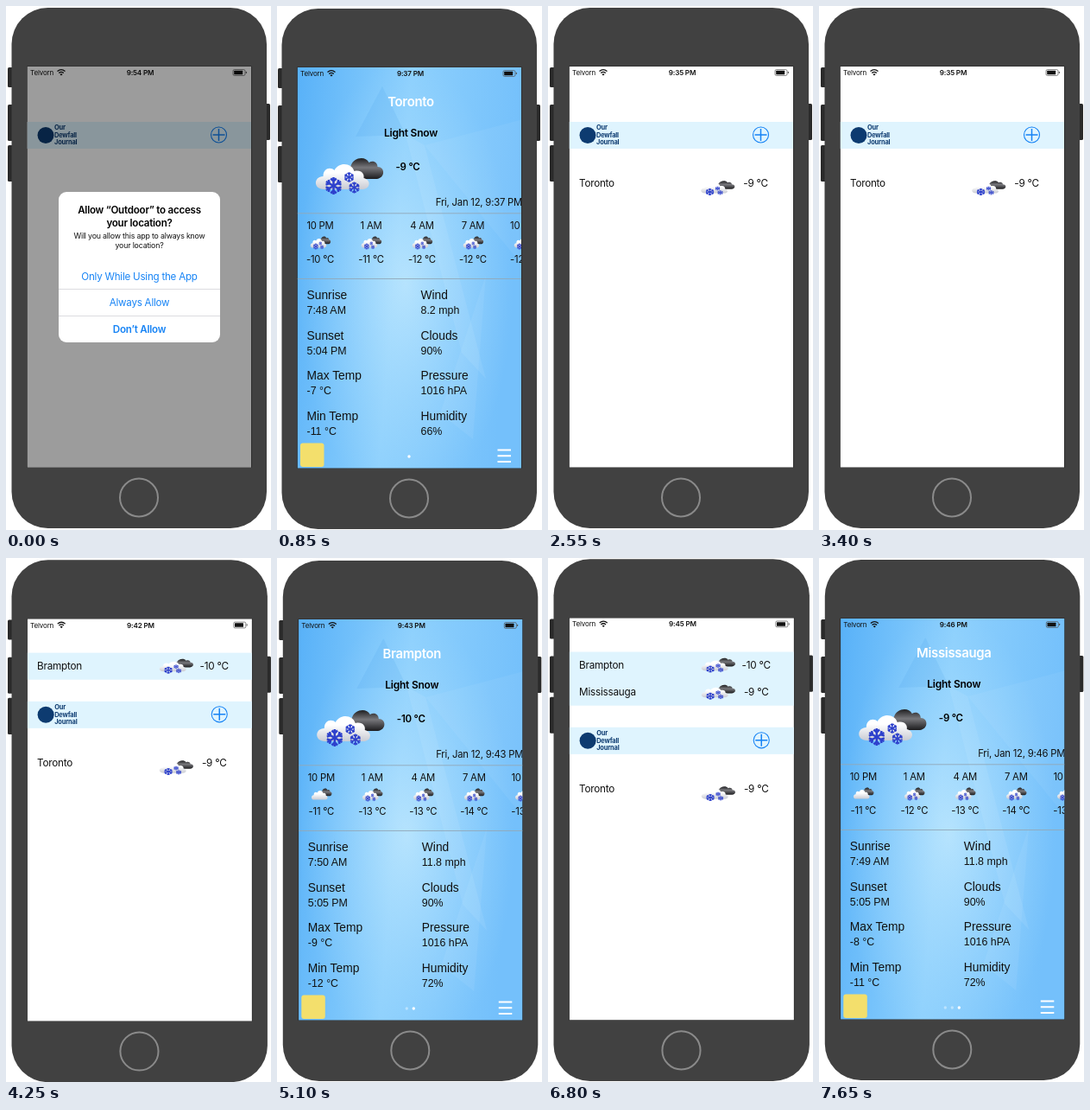
Animation, 307 px wide and 606 px high, one loop 8000 ms. Source, as an HTML page:

```html
<!DOCTYPE html>
<html lang="en">
<head>
<meta charset="utf-8">
<style>
  html, body { margin: 0; height: 100%; overflow: hidden; background: #fff; }
  svg { display: block; width: 100vw; height: 100vh; }
  text { font-family: Inter, "Liberation Sans", sans-serif; letter-spacing: -.02em; white-space: pre; }
  .plain { font-family: "Liberation Sans", Arial, sans-serif; letter-spacing: 0; }
</style>
</head>
<body>
<svg viewBox="0 0 307 606" preserveAspectRatio="none">
  <defs>
    <clipPath id="screen"><rect x="24.8" y="70" width="259.2" height="463.5"/></clipPath>
    <linearGradient id="sky" x1="0" y1="0" x2="1" y2=".15">
      <stop offset="0" stop-color="#58b1f8"/><stop offset=".5" stop-color="#8dd0fd"/><stop offset="1" stop-color="#74c0fb"/>
    </linearGradient>
    <radialGradient id="glow">
      <stop offset="0" stop-color="#c4eafe" stop-opacity=".75"/><stop offset="1" stop-color="#a8dcfd" stop-opacity="0"/>
    </radialGradient>
    <linearGradient id="dark" x1="0" y1="0" x2="0" y2="1">
      <stop offset="0" stop-color="#1f1f21"/><stop offset=".45" stop-color="#77777b"/><stop offset="1" stop-color="#1c1c1e"/>
    </linearGradient>
    <linearGradient id="light" x1="0" y1="0" x2="0" y2="1">
      <stop offset=".35" stop-color="#fff"/><stop offset="1" stop-color="#c9cbd3"/>
    </linearGradient>
    <g id="clouds">
      <path d="M40 27C33 19 36 12 43 12C46 2 60 0 64 8C69 5 74 8 74 13C83 13 83 26 73 27Z" fill="url(#dark)"/>
      <path d="M12 39C-1 39 0 24 11 24C11 14 20 13 24 17C29 7 44 8 47 18C55 16 59 21 58 26C67 28 66 39 56 39Z" fill="url(#light)"/>
    </g>
    <g id="arm"><path d="M0 0V-10M-3.3 -8.5L0 -5.5L3.3 -8.5"/></g>
    <g id="flake" fill="none" stroke="#2d40cc" stroke-width="2.5"></g>
    <g id="snow">
      <use href="#clouds"/>
      <use href="#flake" transform="translate(23 35)"/>
      <use href="#flake" transform="translate(41 25) scale(.58)"/>
      <use href="#flake" transform="translate(47 37) scale(.65)"/>
    </g>
  </defs>
  <g id="stage"></g>
</svg>
<script>
const LOOP = 8000, INK = '#111', BLUE = '#1683f5';
const stage = document.getElementById('stage');

document.getElementById('flake').innerHTML =
  [0, 60, 120, 180, 240, 300].map(a => `<use href="#arm" transform="rotate(${a})"/>`).join('');

const text = (x, y, size, str, { fill = INK, weight = 400, anchor = 'start', cls = '' } = {}) =>
  `<text x="${x}" y="${y}" font-size="${size}" fill="${fill}" font-weight="${weight}" text-anchor="${anchor}" class="${cls}">${str}</text>`;
const center = (x, y, size, str, opts) => text(x, y, size, str, { anchor: 'middle', ...opts });
const rect = (x, y, w, h, fill, r = 0) =>
  `<rect x="${x}" y="${y}" width="${w}" height="${h}" rx="${r}" fill="${fill}"/>`;
const circle = (x, y, r, fill) => `<circle cx="${x}" cy="${y}" r="${r}" fill="${fill}"/>`;
const line = (d, stroke, width = 1) => `<path d="${d}" fill="none" stroke="${stroke}" stroke-width="${width}"/>`;
const icon = (id, x, y, sx, sy = sx) => `<use href="#${id}" transform="translate(${x} ${y}) scale(${sx} ${sy})"/>`;
const cover = fill => rect(24, 69, 262, 466, fill);
const degrees = n => `${n} °C`;

const cities = [
  { name: 'Toronto', temp: -9, clock: '9:37', hours: [-10, -11, -12, -12, -12], snowFrom: 0,
    sun: ['7:48 AM', '5:04 PM'], wind: '8.2', range: [-7, -11], humidity: 66 },
  { name: 'Brampton', temp: -10, clock: '9:43', hours: [-11, -13, -13, -14, -13], snowFrom: 1,
    sun: ['7:50 AM', '5:05 PM'], wind: '11.8', range: [-9, -12], humidity: 72 },
  { name: 'Mississauga', temp: -9, clock: '9:46', hours: [-11, -12, -13, -14, -13], snowFrom: 1,
    sun: ['7:49 AM', '5:05 PM'], wind: '11.8', range: [-8, -11], humidity: 72 },
];

function statusBar(clock) {
  return text(28, 80, 8, 'Telvorn') +
    line('M59.5 75.6Q64 71.8 68.5 75.6M61.2 77.5Q64 75.2 66.8 77.5', INK, 1.3) +
    `<path d="M62.4 78.9Q64 77.6 65.6 78.9L64 80.6Z" fill="${INK}"/>` +
    center(155.5, 80, 8.1, clock + ' PM', { weight: 600 }) +
    `<rect x="263" y="73.6" width="14" height="6.8" rx="1.5" fill="none" stroke="#555" stroke-width=".7"/>` +
    rect(264.2, 74.8, 10, 4.4, INK, .5) + rect(277.8, 75.8, 1, 2.2, '#555', .5);
}

function phone(content, clock) {
  const buttons = [[2, 71, 23], [2, 114, 42], [2, 161, 42], [300, 113, 42]];
  return buttons.map(([x, y, h]) => rect(x, y, 6, h, '#2a2a2a', 1.5)).join('') +
    rect(6.5, 2, 295.5, 602, '#414141', 42) + rect(24.2, 69.6, 260.4, 464.2, '#222') +
    `<g clip-path="url(#screen)">${content}</g>` +
    `<circle cx="154" cy="568.5" r="22" fill="none" stroke="#8a8a8a" stroke-width="2"/>`;
}

function header(y) {
  const navy = { fill: '#0d3b70', weight: 700 };
  return rect(24, y, 262, 31, '#dff4fe') + circle(46, y + 15.5, 9.5, navy.fill) +
    ['Our', 'Dewfall', 'Journal'].map((word, i) => text(56, y + 9 + i * 8.7, 7.4, word, navy)).join('') +
    `<circle cx="246.5" cy="${y + 15}" r="9" fill="none" stroke="${BLUE}" stroke-width="1.1"/>` +
    line(`M239.5 ${y + 15}h14M246.5 ${y + 8}v14`, BLUE, 1.5);
}

const row = (city, y, iconY) => text(36, y, 11.7, city.name) +
  icon('snow', 176, iconY, .5, .4) + center(240.5, y, 11.7, degrees(city.temp));

function list(saved, clock) {
  const shift = saved * 31;
  let out = cover('#fff') + statusBar(clock);
  if (saved) out += rect(24, 109, 262, shift, '#dff4fe');
  for (let i = 1; i <= saved; i++) out += row(cities[i], 97 + i * 31, 84 + i * 31);
  return phone(out + header(134 + shift) + row(cities[0], 209 + shift, 201 + shift));
}

function alertBox() {
  const bold = { weight: 600, fill: '#000' };
  const choices = ['Only While Using the App', 'Always Allow', 'Don’t Allow'];
  return phone(cover('#fff') + statusBar('9:54') + header(134) +
    cover('rgba(0,0,0,.39)') + rect(61, 215, 187, 174, '#fff', 9) +
    center(154.5, 240, 11.6, 'Allow “Outdoor” to access', bold) +
    center(154.5, 255, 11.6, 'your location?', bold) +
    center(154.5, 269, 8.8, 'Will you allow this app to always know') +
    center(154.5, 280, 8.8, 'your location?') +
    line('M61 327.5h187M61 358.5h187', '#dcdce0') +
    choices.map((s, i) => center(154.5, 316.5 + i * 30.8, 11.6, s,
      { fill: BLUE, weight: i === 2 ? 600 : 400 })).join(''));
}

function backdrop() {
  const shard = (points, fill) => `<polygon points="${points}" fill="${fill}"/>`;
  return cover('url(#sky)') +
    '<ellipse cx="150" cy="320" rx="125" ry="260" fill="url(#glow)"/>' +
    shard('123,92 92,150 150,148', 'rgba(55,150,225,.13)') +
    shard('150,148 172,160 243,430 215,400', 'rgba(255,255,255,.07)') +
    shard('172,160 286,300 286,130', 'rgba(255,255,255,.05)') +
    shard('243,310 228,500 190,470', 'rgba(255,255,255,.06)');
}

function detail(index) {
  const c = cities[index], times = ['10 PM', '1 AM', '4 AM', '7 AM', '10 AM'];
  const facts = [
    ['Sunrise', c.sun[0], 'Wind', c.wind + ' mph'],
    ['Sunset', c.sun[1], 'Clouds', '90%'],
    ['Max Temp', degrees(c.range[0]), 'Pressure', '1016 hPA'],
    ['Min Temp', degrees(c.range[1]), 'Humidity', c.humidity + '%'],
  ];
  const plain = { cls: 'plain' };
  let out = backdrop() + statusBar(c.clock) +
    center(156, 114.5, 14.9, c.name, { fill: '#fff', weight: 600 }) +
    center(156, 149.5, 12, 'Light Snow', { weight: 600, fill: '#000' }) +
    icon('snow', 43.5, 172, 1) +
    text(138.5, 188.5, 11.5, degrees(c.temp), { weight: 600, fill: '#000' }) +
    text(285, 229.5, 11.3, `Fri, Jan 12, ${c.clock} PM`, { anchor: 'end' }) +
    line('M24 238.8h262M24 314.5h262', '#92a9b8', .9);
  times.forEach((time, i) => {
    const x = 51 + i * 59;
    out += center(x, 257, 11.3, time) +
      icon(i < c.snowFrom ? 'clouds' : 'snow', x - 12, 264.5, .3, .36) +
      center(x, 295.5, 11.3, degrees(c.hours[i]));
  });
  facts.forEach(([a, b, d, e], i) => {
    const y = 338 + i * 46.5;
    out += text(35.5, y, 13.8, a, plain) + text(35.5, y + 17, 12.4, b, plain) +
      text(167.5, y, 13.8, d, plain) + text(167.5, y + 17, 12.4, e, plain);
  });
  for (let i = 0; i <= index; i++)
    out += circle(154 + (i - index / 2) * 8, 520, 1.7, i === index ? '#fff' : 'rgba(255,255,255,.4)');
  out += rect(28, 504.5, 27.5, 27.5, '#f3df6c', 3) +
    line('M256.5 512.5h15.5M256.5 519.3h15.5M256.5 526h15.5', '#fff', 2);
  return phone(out);
}

// start time, picture, then the small drift and scale of the whole device
const scenes = [
  [0, alertBox(), 0, 0, 1],
  [850, detail(0), -1, 1, 1],
  [1700, list(0, '9:35'), 0, 0, 1],
  [4250, list(1, '9:42'), 0, .3, 1.003],
  [5100, detail(1), .3, 1, 1],
  [5950, list(1, '9:42'), 0, .3, 1.003],
  [6800, list(2, '9:45'), 0, -.8, 1.003],
  [7650, detail(2), .3, 0, 1],
];

let shown;
function draw() {
  const now = performance.now() % LOOP;
  const scene = scenes.findLast(([start]) => start <= now);
  if (scene !== shown) {
    const [, picture, dx, dy, scale] = shown = scene;
    stage.setAttribute('transform', `translate(${dx} ${dy}) scale(${scale})`);
    stage.innerHTML = picture;
  }
  requestAnimationFrame(draw);
}
draw();
</script>
</body>
</html>
```
